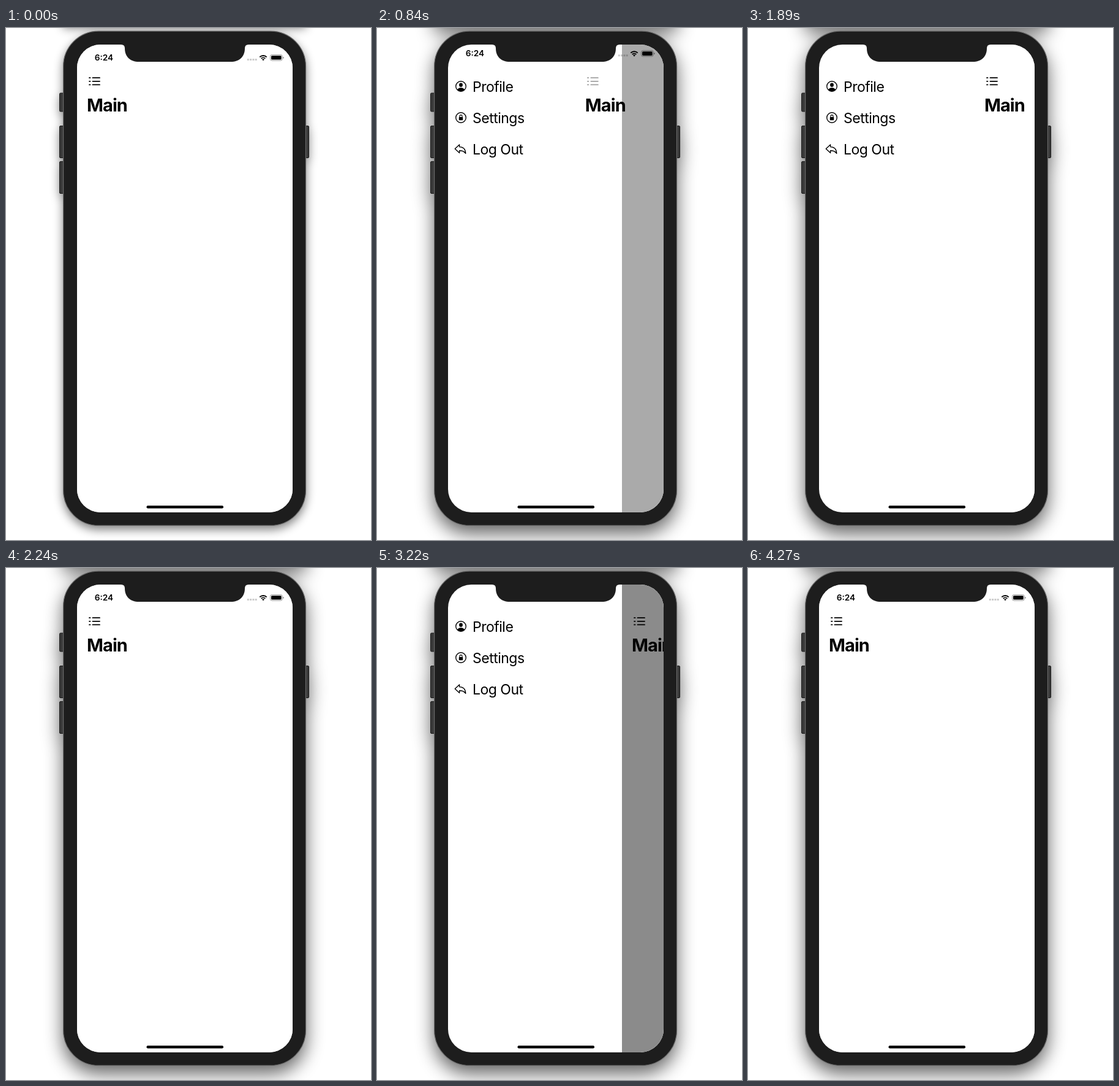
An HTML page for the animation above (4480 ms loop, 596x834 px).

```html
<!DOCTYPE html>
<html lang="en">
<head>
<meta charset="utf-8">
<title>Side menu</title>
<style>
  html, body { margin: 0; width: 100%; height: 100%; overflow: hidden; background: #fff; }
  svg { display: block; width: 596px; height: 834px; }
  text { font-family: Inter, "Liberation Sans", sans-serif; }
  .title { font-size: 28.9px; font-weight: 700; letter-spacing: -.9px; }
  .item { font-size: 23px; letter-spacing: -.5px; }
  .time { font-size: 13.6px; font-weight: 600; text-anchor: middle; }
  .line { fill: none; stroke: #000; stroke-width: 1.4; stroke-linejoin: round; }
</style>
</head>
<body>
<svg viewBox="0 0 596 834">
  <defs>
    <filter id="soft" filterUnits="userSpaceOnUse" x="0" y="-120" width="596" height="1060">
      <feGaussianBlur stdDeviation="8"/>
    </filter>
    <filter id="wide" filterUnits="userSpaceOnUse" x="0" y="-120" width="596" height="1060">
      <feGaussianBlur stdDeviation="15"/>
    </filter>
    <clipPath id="screen"><rect x="116" y="27" width="352" height="762" rx="38"/></clipPath>
    <clipPath id="face"><circle cx="137" cy="95" r="8"/></clipPath>
    <g id="buttons">
      <rect x="87.5" y="106" width="8" height="30" rx="1.5"/>
      <rect x="87.5" y="159.500" width="8" height="52" rx="1.5"/>
      <rect x="87.5" y="217.500" width="8" height="52" rx="1.5"/>
      <rect x="487" y="159.500" width="7.500" height="52" rx="1.5"/>
    </g>
    <g id="outline">
      <rect x="93" y="-60" width="397" height="54"/>
      <rect x="93" y="5" width="397" height="806" rx="58"/>
      <use href="#buttons"/>
    </g>
  </defs>

  <rect width="596" height="834" fill="#fff"/>
  <g id="idle" opacity=".5" filter="url(#soft)"><use href="#outline" y="6"/></g>
  <g id="active" opacity=".6" filter="url(#wide)"><use href="#outline" y="13"/></g>

  <use href="#buttons" fill="#3a3a3a" stroke="#1a1a1a"/>
  <rect x="93.600" y="5.100" width="395.900" height="805.300" rx="57.500" fill="#1d1d1d" stroke="#6c6c6c" stroke-width="1.2"/>

  <g clip-path="url(#screen)">
    <rect x="116" y="27" width="352" height="762" fill="#fff"/>

    <g id="menu">
      <rect id="row" x="116" y="69" width="284" height="52" fill="#d9d9da"/>
      <circle class="line" cx="137" cy="95" r="8.300"/>
      <g clip-path="url(#face)">
        <ellipse cx="137" cy="92.800" rx="2.900" ry="3.300"/>
        <ellipse cx="137" cy="102.200" rx="6.300" ry="5"/>
      </g>
      <circle class="line" cx="137" cy="146" r="8.300"/>
      <rect x="133.800" y="145" width="6.400" height="5.200" rx=".8"/>
      <path class="line" style="stroke-width:1.1" d="M135 145.500v-1.700a2 2.200 0 0 1 4 0v1.700"/>
      <path class="line" d="M127.300 196.700L134.600 190V193.600C141 193.600 144.500 197.200 144.700 204.500C142.500 200.800 139.600 199.800 134.600 199.800V203.600Z"/>
      <text class="item" x="156" y="104">Profile</text>
      <text class="item" x="156" y="155">Settings</text>
      <text class="item" x="156" y="206">Log Out</text>
    </g>

    <g id="page">
      <rect x="116" y="27" width="352" height="762" fill="#fff"/>
      <path id="listIcon" d="M136 81.200h1.500M136 86.800h1.500M136 92.400h1.500M141.500 81.200h11.500M141.500 86.800h11.500M141.500 92.400h11.500"
        fill="none" stroke="#000" stroke-width="1.8" stroke-linecap="round"/>
      <text class="title" x="132" y="136">Main</text>
    </g>

    <rect id="dim" x="400" y="27" width="68" height="762"/>

    <g id="status">
      <text class="time" x="160" y="53">6:24</text>
      <path d="M393.800 50h3v3h-3zM398.100 50h3v3h-3zM402.400 50h3v3h-3zM406.700 50h3v3h-3z" opacity=".2"/>
      <path d="M414.300 47.300a8.100 8.100 0 0 1 11.400 0M416.700 49.700a4.700 4.700 0 0 1 6.600 0" fill="none" stroke="#000" stroke-width="1.9"/>
      <path d="M420 53.200l-1.900-2a2.700 2.700 0 0 1 3.800 0z"/>
      <rect x="431.500" y="43.500" width="19.700" height="9.600" rx="2.900" fill="none" stroke="#000" stroke-opacity=".4"/>
      <rect x="433" y="45" width="16.700" height="6.600" rx="1.600"/>
      <path d="M452.200 46.700q1.500.5 1.500 1.600t-1.500 1.600z" opacity=".45"/>
    </g>

    <rect x="229.500" y="778" width="125.500" height="4.400" rx="2.200"/>
  </g>
  <path d="M188 26V27Q194 27 194 33C194 47 203 55 217 55H367C381 55 390 47 390 33Q390 27 396 27V26Z" fill="#1d1d1d"/>
</svg>

<script>
const LOOP = 4480, STEP = 70;
const MENU_WIDTH = 284, BAR_HEIGHT = 37, BAR_LAG = 23;
const ACTIVATE = 700, ROW_TAP = 3500;
const visits = [
  { press: 700, open: 722, close: 1865 },
  { press: 2730, open: 2749, close: 3523 }
];
const el = id => document.getElementById(id);
const idle = el('idle'), active = el('active'), row = el('row'), page = el('page');
const listIcon = el('listIcon'), dim = el('dim'), status = el('status');

// Critically damped spring, 0 to 1
function spring(ms) {
  const x = Math.max(0, ms) * 0.022;
  return x > 8 ? 1 : 1 - (1 + x) * Math.exp(-x);
}
function smooth(ms, duration) {
  const x = Math.min(1, Math.max(0, ms / duration));
  return x * x * (3 - 2 * x);
}
function show(node, on) {
  node.setAttribute('visibility', on ? 'visible' : 'hidden');
}

function draw(t) {
  const v = t < visits[1].press ? visits[0] : visits[1];
  const opened = spring(t - v.open);
  const shift = MENU_WIDTH * (opened - spring(t - v.close));
  const hidden = smooth(t - v.open - BAR_LAG, 350) - smooth(t - v.close - BAR_LAG, 350);

  show(idle, t < ACTIVATE);
  show(active, t >= ACTIVATE);
  show(row, t >= ROW_TAP);
  page.setAttribute('transform', `translate(${shift.toFixed(2)} 0)`);
  listIcon.setAttribute('opacity', t < v.press ? 1 : 0.2 + 0.8 * smooth(t - v.open, 400));
  dim.setAttribute('opacity', t < v.close ? 0.455 * opened : 0);
  status.setAttribute('transform', `translate(0 ${(-BAR_HEIGHT * hidden).toFixed(2)})`);
}

const start = performance.now();
function tick() {
  const t = (performance.now() - start) % LOOP;
  draw(Math.floor(t / STEP) * STEP);
  requestAnimationFrame(tick);
}
tick();
</script>
</body>
</html>
```
